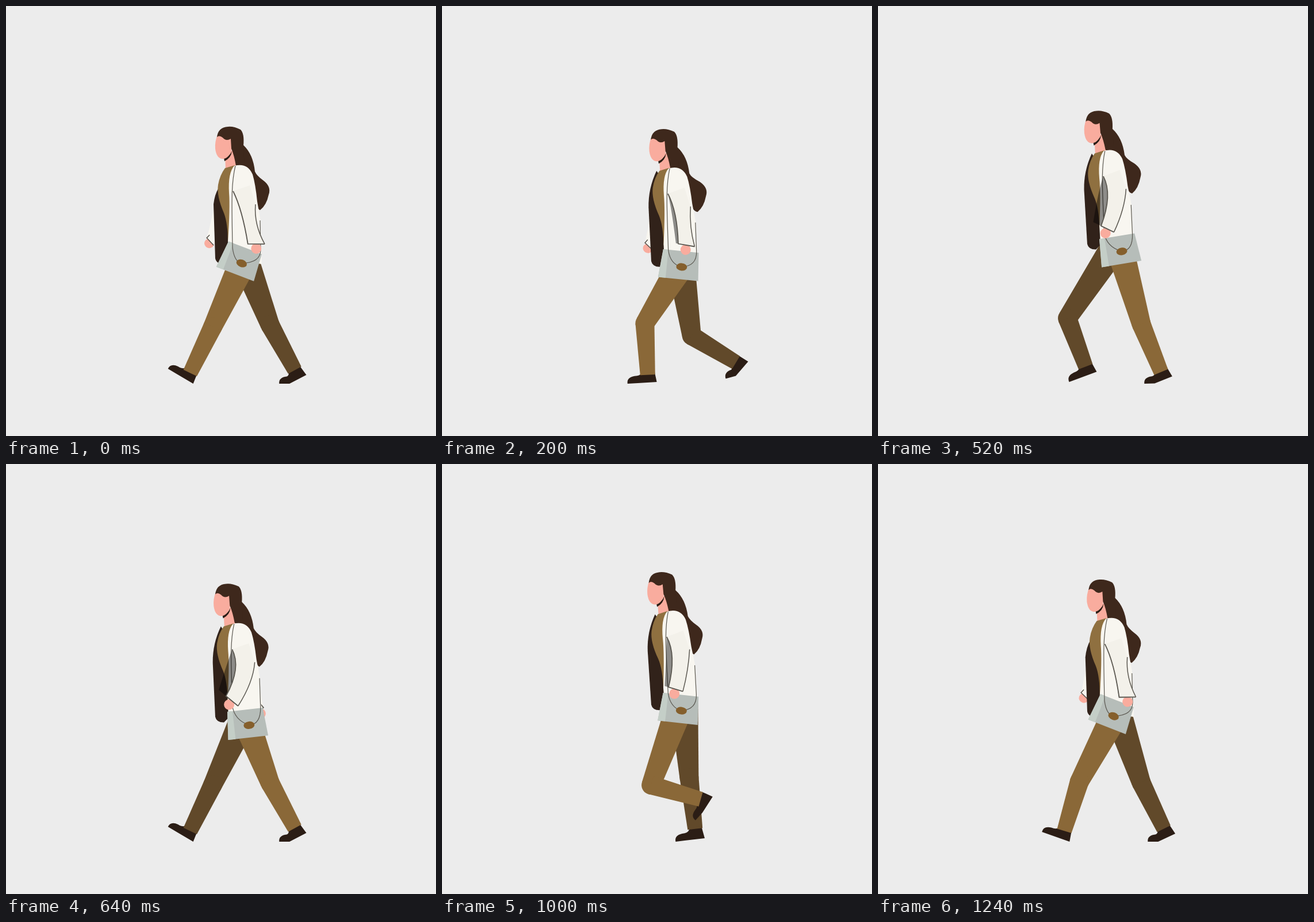
Recreate the animation shown at these times as an HTML page with a canvas. Size 748 by 748 pixels, loop 1.28 s.

```html
<!DOCTYPE html>
<html lang="en">
<head>
<meta charset="utf-8">
<title>Walk cycle</title>
<style>
  html, body { margin: 0; height: 100%; overflow: hidden; background: #ececec; }
  canvas { display: block; }
</style>
</head>
<body>
<canvas id="stage" width="748" height="748"></canvas>
<script>
const ctx = document.getElementById('stage').getContext('2d');
const LOOP = 1280, STEP = 40, GROUND = 657, SHIN = 90, RAD = Math.PI / 180;
const SKIN = '#f9ac9e', HAIR = '#3e281c', SHOE = '#2b1d15', LINE = '#5a5750';
const COAT = '#f8f6f0', SLEEVE = '#f3f1ea';
const { sin, cos, min, max, hypot } = Math;

// Periodic motion: a mean plus [cosine, sine] weights of successive harmonics
const wave = (phase, mean, ...harmonics) => harmonics.reduce(
  (sum, [c, s], i) => sum + c * cos((i + 1) * phase) + s * sin((i + 1) * phase), mean);

const turn = ([x, y], a) => [x * cos(a) - y * sin(a), x * sin(a) + y * cos(a)];

const fill = (path, color) => { ctx.fillStyle = color; ctx.fill(new Path2D(path)); };

function stroke(path, width = 1.5) {
  ctx.strokeStyle = LINE;
  ctx.lineWidth = width;
  ctx.stroke(new Path2D(path));
}

function ellipse(x, y, rx, ry, color, angle = 0) {
  ctx.fillStyle = color;
  ctx.beginPath();
  ctx.ellipse(x, y, rx, ry, angle, 0, 7);
  ctx.fill();
}

// Tapered segment between two joints, given half widths
function limb(x1, y1, r1, x2, y2, r2, color) {
  const d = hypot(x2 - x1, y2 - y1), nx = (y1 - y2) / d, ny = (x2 - x1) / d;
  fill(`M${x1 + nx * r1},${y1 + ny * r1} L${x2 + nx * r2},${y2 + ny * r2}
    L${x2 - nx * r2},${y2 - ny * r2} L${x1 - nx * r1},${y1 - ny * r1}Z`, color);
}

function shoe(x, y, angle, bend, grounded) {
  const place = p => {
    const [px, py] = turn(p, angle);
    return [x + px, y + py];
  };
  const toe = (px, py) => {
    const [qx, qy] = turn([px + 18, py - 15], bend);
    return place([qx - 18, qy + 15]);
  };
  const heel = place([15, 15]), ball = place([-18, 15]), tip = toe(-36, 15);
  const drop = grounded ? GROUND - max(heel[1], ball[1], tip[1]) : 0;
  ctx.save();
  ctx.translate(0, drop);
  fill(`M${place([-10, -5])} L${place([12, -5])} L${place([13, 2])} L${heel} L${ball} L${tip}
    Q${toe(-37, 4)} ${toe(-23, 2.5)} Q${place([-13, 3])} ${place([-10, -3])}Z`, SHOE);
  ctx.restore();
}

function leg(phase, bob, color) {
  const shin = wave(phase, 24, [-19.4, -30.8], [-19, -2.7], [-7.9, 3.5], [-3.7, 0.5]);
  const dx = SHIN * sin(shin * RAD), dy = SHIN * cos(shin * RAD);
  const hipX = 415 + 6 * max(0, sin(phase)), hipY = 440 + bob;
  const kneeX = wave(phase, 399, [-65, 12.5], [7, 2.8], [15.3, 0.3], [3.5, 4]);
  const kneeY = min(GROUND - 15 - dy, wave(phase, 555.5, [-3.5, -6.1], [0.5, 8], [5, 4.8]));
  const ankleX = kneeX + dx, ankleY = kneeY + dy;

  // The foot counters the shin; the toe bends as it pushes off
  const foot = -shin * (1.07 - 0.004 * shin);
  const bend = max(0, min(-foot, 40 * cos(phase - 205 * RAD)));
  const grounded = sin(phase + 0.2) > -0.2 && cos(phase) > -1.01 && !(sin(phase) < -0.2);
  shoe(ankleX, ankleY, foot * RAD, bend * RAD, grounded);
  limb(hipX, hipY, 24.5, kneeX, kneeY, 16.5, color);
  ellipse(kneeX, kneeY, 16.5, 16.5, color);
  limb(kneeX, kneeY, 16.5, ankleX, ankleY, 13, color);
}

function farArm(phase) {
  const angle = wave(phase, 0.5, [19.4, 10.4], [2, 0]);
  const reach = 1.09 - 0.004 * angle;
  ctx.save();
  ctx.translate(400, 300);
  ctx.rotate(angle * RAD);
  ctx.scale(angle < 0 ? -reach : reach, reach);
  ellipse(-1, 122, 8.5, 8, SKIN);
  fill('M-21,28 L-17,57 L-10,101 L-8.6,114.6 L7.3,122 L15,30Z', COAT);
  stroke('M-5.9,108 L-8.6,114.6 L7.3,122');
  ctx.restore();
}

function head(phase) {
  const swing = wave(phase, 1.2, [0, 3], [-1.2, 0]);
  const s = x => x + swing;
  ctx.save();
  ctx.translate(0, cos(phase) - 1);
  fill(`M400,240 L413,242 Q430,258 433,288 Q436,295 ${s(447)},303 Q${s(462)},314 ${s(457)},328
    Q${s(453)},347 ${s(442)},355 Q437,354 436,340 L420,290 L398,277Z`, HAIR);
  fill('M381,258 L396,250 L401,280 L391,288 L382,284Z', SKIN);
  fill('M379,264 Q389,262 393,252 Q392,264 380,270Z', SHOE);
  fill('M368,224 Q363,236 364,248 Q366,266 378,266 Q389,264 393,248 L393,228Z', SKIN);
  fill(`M367,228 Q369,211 386,210 Q396,209 408,215 Q415,222 413,243 L415,285 L400,278
    Q397,260 392,248 L391,231 Q383,236 377,229 Q371,224 367,228Z`, HAIR);
  ctx.restore();
}

function torso(phase) {
  const tuck = max(0, min(1, 2.5 * cos(phase) - 1.5));
  const mix = (a, b) => a + (b - a) * tuck;
  fill(`M${mix(376, 369)},${mix(282, 318)} Q${mix(361, 363)},${mix(312, 328)} 361,345
    L364,439 Q366,449 379,449 L388,440 L388,300Z`, '#31221a');
  fill(`M381,282 L398,277 L392,300 L392,400 L386,412 Q386,378 379,360
    Q366,330 369,311 Q372,294 381,282Z`, '#8f7040');
  fill(`M397,278 Q420,272 429,293 Q434,310 437,340 L443,375 L445,449 L387,440
    L386,410 Q390,350 388,325 Q386,290 397,278Z`, COAT);
}

function bag(phase) {
  const angle = wave(phase, 4.4, [13.3, -4.5], [3.3, 0]) * RAD;
  const top = 424 - 3.5 * cos(phase);
  ctx.save();
  ctx.translate(416, top);
  ctx.rotate(angle);
  fill('M-31,0 L31,0 L35,49 L-35,49Z', '#b6bdb9');
  fill('M-31,0 L-22,0 L-22,49 L-35,49Z', '#c4cec7');
  ctx.restore();
  const [x, y] = turn([4, 27.5], angle), cx = 416 + x, cy = top + y;
  stroke(`M399,278 C391,312 393,345 394,420 Q397,445 ${cx},${cy}
    Q443,${cy - 1} 443,424 L442,373`, 1.2);
  ellipse(cx, cy, 9.5, 6.5, '#855f2c', angle);
}

function nearArm(phase) {
  const swing = cos(phase - 0.28), sway = wave(2 * phase, 0, [3, -1.4]);
  const lx = 399 + 19.5 * swing + sway, ly = 408.5 + 5.5 * swing - 3.6 * sin(2 * phase);
  const rx = 424 + 24 * swing + sway, ry = 417.5 - 3.5 * swing;
  const shade = 8.5 - 8 * cos(phase);
  const d = hypot(rx - lx, ry - ly), ux = (rx - lx) / d, uy = (ry - ly) / d;
  const inner = `Q411,354 ${lx},${ly}`, outer = `Q431,380 ${rx},${ry}`;
  fill(`M395,322 ${inner} L${lx - ux * shade},${ly - uy * shade}
    Q${411 - min(25, shade * 2.5)},346 395,322Z`, 'rgba(0,0,0,.43)');
  ellipse((lx + rx) / 2 - uy * 8, (ly + ry) / 2 + ux * 8, 9, 9, SKIN);
  fill(`M395,322 L424,312 L434,345 ${outer} L${lx},${ly} Q411,354 395,322Z`, SLEEVE);
  stroke(`M395,322 ${inner} L${rx},${ry}`, 1.8);
  stroke(`M434,345 ${outer}`);
}

function upperBody(phase, bob, ...parts) {
  const lean = wave(phase, -1.2, [0.4, 0], [0.8, 0.3]);
  ctx.save();
  ctx.translate(415, 440 + bob);
  ctx.rotate(lean * RAD);
  ctx.translate(-415, -440);
  parts.forEach(part => part(phase));
  ctx.restore();
}

function render(now) {
  const phase = Math.floor(now % LOOP / STEP) * STEP / LOOP * 2 * Math.PI;
  const bob = wave(2 * phase, -9.4, [7.4, 19.6], [2, 0.5]);
  ctx.fillStyle = '#ececec';
  ctx.fillRect(0, 0, 748, 748);
  upperBody(phase, bob, farArm);
  leg(phase + Math.PI, bob, '#61492a');
  leg(phase, bob, '#8a6838');
  upperBody(phase, bob, head, torso, bag, nearArm);
  requestAnimationFrame(render);
}
requestAnimationFrame(render);
</script>
</body>
</html>
```
